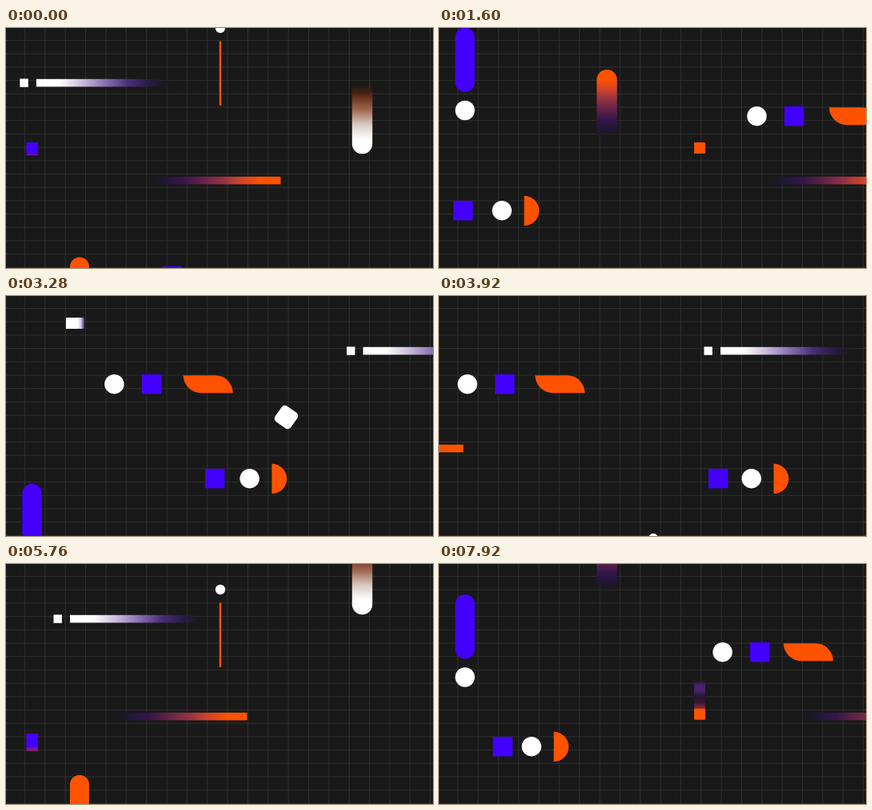
These frames come from a looping animation (534 px wide and 300 px high, 8000 ms). An HTML page:

```html
<!DOCTYPE html>
<html lang="en">
<head>
<meta charset="utf-8">
<title>Shapes on a grid</title>
<style>
  html, body { margin: 0; width: 100%; height: 100%; overflow: hidden; background: #191919; }
  svg { display: block; width: 100vw; height: 100vh; }
</style>
</head>
<body>
<svg id="stage" viewBox="0 0 534 300" preserveAspectRatio="none"></svg>
<script>
const LOOP = 8000, STEP = 80, CYCLE = 6045, LATE = 2500;
const BACK = '#191919', BLUE = '#4400ff', ORANGE = '#ff5200', WHITE = '#ffffff';
// Sprites are drawn with the trail towards +x, then turned to their heading.
const LEFT = 0, RIGHT = 180, UP = 90, DOWN = -90;
const stage = document.getElementById('stage');
const movers = [];

function el(tag, attrs, parent = stage) {
  const node = document.createElementNS('http://www.w3.org/2000/svg', tag);
  for (const key in attrs) node.setAttribute(key, attrs[key]);
  return parent.appendChild(node);
}

// Evenly spaced stops; the background colour stands for transparent
const defs = el('defs', {});
function gradient(id, ...colors) {
  const g = el('linearGradient', { id }, defs);
  colors.forEach((color, i) => el('stop', {
    offset: i / (colors.length - 1), 'stop-color': color, 'stop-opacity': color === BACK ? 0 : 1
  }, g));
  return `url(#${id})`;
}

const lavender = gradient('lavender', WHITE, WHITE, '#cbbbdc', '#8a70b2', '#4a2f78', '#271a42', BACK);
const ember = gradient('ember', ORANGE, ORANGE, '#cf4429', '#913243', '#622349', '#35164a', '#211636', BACK);
const glow = gradient('glow', WHITE, WHITE, '#d8c8c0', '#a0664c', '#5a2814', BACK);
const whiteTail = gradient('whiteTail', WHITE, '#d9cdf0', '#4a2a80');
const blueTail = gradient('blueTail', BLUE, '#6a20a0', '#4a1c38');
const blueEcho = gradient('blueEcho', '#4a1c42', '#64226a', '#5822a0', '#7c2a48', '#3a1a1e');
const redEcho = gradient('redEcho', BACK, '#8a2a45', '#8a2a45', BACK);
const riseTail = gradient('riseTail', BLUE, BLUE, '#8a2080', '#701c60');
const fallTail = gradient('fallTail', '#8a2a40', '#351832', '#24162c', '#4a2070', '#4a2070', BACK);

const clamp = v => Math.max(0, Math.min(1, v));
const wrap = (t, start, period) => start + ((t - start) % period + period) % period;
const steady = (time, place, speed) => u => place + speed * (u - time);

function mover(heading, lane, path, { period = CYCLE, start = 0, scale = () => 1 } = {}) {
  const node = el('g', {});
  const flat = heading === LEFT || heading === RIGHT;
  movers.push(t => {
    const u = wrap(t, start, period), p = path(u);
    const place = flat ? [p, lane] : [lane, p];
    node.setAttribute('transform', `translate(${place}) rotate(${heading}) scale(${scale(u)})`);
  });
  return node;
}

const bar = (g, from, length, height, fill, rx = 0) =>
  el('rect', { x: from, y: -height / 2, width: length, height, fill, rx }, g);
const disc = (g, r, fill) => el('circle', { r, fill }, g);
const shape = (g, d, fill) => el('path', { d, fill }, g);
const bullet = (g, length, r, fill) =>
  shape(g, `M${length} ${-r}H${r}A${r} ${r} 0 0 0 ${r} ${r}H${length}Z`, fill);

// A bar that rises over the lower edge and sinks again
function peek(x, start, span, height, fill, rx) {
  const path = u => 306 - height * Math.sin(Math.PI * clamp((u - start) / span));
  bar(mover(UP, x, path, { start: LATE }), 0, 90, 24, fill, rx);
}

// A spinning square that pops in and out
function spinner(x, y, peak, angle, fill, rx) {
  const node = el('rect', { x: -12, y: -12, width: 24, height: 24, rx, fill });
  movers.push(t => {
    const d = wrap(t, 0, CYCLE) - peak;
    const scale = clamp((450 - Math.abs(d)) / 150);
    node.setAttribute('transform', `translate(${x} ${y}) rotate(${angle + d * .09}) scale(${scale})`);
  });
}

// Grid
el('rect', { width: 534, height: 300, fill: BACK });
let lines = '';
for (let x = 23.6; x < 534; x += 25.35) lines += `M${x} 0V300`;
for (let y = 15.5; y < 300; y += 16.7) lines += `M0 ${y}H534`;
el('path', { d: lines, stroke: '#303030', fill: 'none' });

// Long horizontal trails
let g = mover(LEFT, 68.6, steady(5760, 59.5, -.1478), { start: LATE });
bar(g, 0, 10.4, 10.4, WHITE);
bar(g, 20.5, 172, 9.6, lavender);
g = mover(RIGHT, 190.6, steady(5760, 301.5, .1473), { start: LATE });
bar(g, 0, 172, 9.6, ember);

// Ball with a line below
g = mover(UP, 268, steady(5760, 32, -.1473), { period: 5977, start: LATE });
disc(g, 6.2, WHITE);
bar(g, 16.5, 80.5, 2.5, ORANGE);

// Vertical comets
g = mover(DOWN, 445.5, steady(5760, 63.3, .33), { start: LATE });
bullet(g, 92, 12.7, glow);
g = mover(UP, 210, steady(1600, 52, -.303), { period: 5977 });
bullet(g, 87, 12.7, ember);

// Blue capsule above a ball
g = mover(DOWN, 32.5, steady(1600, 103, .14));
disc(g, 12.2, WHITE);
bar(g, 23, 80.5, 24.4, BLUE, 12.2);

peek(92, 5450, 700, 43, ORANGE, 12);
peek(208, 5800, 300, 15, BLUE, 0);

// Trio heading left
disc(mover(LEFT, 110.2, steady(1600, 397.5, -.156)), 12.2, WHITE);
bar(mover(LEFT, 110.2, steady(1600, 432, -.156)), 0, 24.4, 24.4, BLUE);
shape(mover(LEFT, 110.2, steady(1600, 488, -.1585), { period: 5960 }),
  'M0 -11H40A22 22 0 0 1 62 11H22A22 22 0 0 1 0 -11Z', ORANGE);

// Trio heading right
bar(mover(LEFT, 228.2, steady(1600, 18, .1375), { period: 5960 }), 0, 24.4, 24.4, BLUE);
disc(mover(LEFT, 228.2, steady(1600, 78.7, .1345)), 12.2, WHITE);
shape(mover(LEFT, 228.5, steady(1600, 106.5, .1345)),
  'M0 -18.7A18.7 18.7 0 0 1 0 18.7Z', ORANGE);

// Small quick squares
g = mover(LEFT, 34, steady(3280, 75, -.34));
bar(g, 0, 14, 14, WHITE);
bar(g, 14, 9, 14, whiteTail);

g = mover(LEFT, 111, steady(4640, 399, -.5), { start: LATE });
bar(g, 0, 14, 14, BLUE);
bar(g, 14, 15.5, 14, blueTail);
bar(g, 59, 51, 14, blueEcho);

g = mover(UP, 32.7, steady(5760, 212, -.242), { start: LATE });
const rise = bar(g, 14, 8, 14.5, riseTail);
bar(g, 0, 14.5, 14.5, BLUE);
movers.push(t => rise.setAttribute('width', 2 + 6 * clamp((CYCLE - wrap(t, LATE, CYCLE)) / 285)));

g = mover(DOWN, 505, steady(755, 272, .4));
bar(g, 0, 14, 14, BLUE);
bar(g, 14, 9, 14, blueTail);
bar(g, 28, 23, 14, redEcho);

// Square that waits, then drops with a growing tail
const drop = u => .137 * Math.max(0, u - 1600);
g = mover(DOWN, 326, u => 157 + drop(u), {
  scale: u => clamp((u - 1300) / 200) * clamp((2250 - u) / 120)
});
const fall = bar(g, 14, 0, 14, fallTail);
bar(g, 0, 14, 14, ORANGE);
movers.push(t => fall.setAttribute('width', Math.min(37, drop(wrap(t, 0, CYCLE)))));

spinner(204.5, 150, 755, 45, BLUE, 0);
spinner(350.5, 151.5, 3280, 35, WHITE, 5);

let origin;
function frame(now) {
  origin ??= now;
  const t = Math.floor((now - origin) % LOOP / STEP) * STEP;
  for (const move of movers) move(t);
  requestAnimationFrame(frame);
}
requestAnimationFrame(frame);
</script>
</body>
</html>
```
